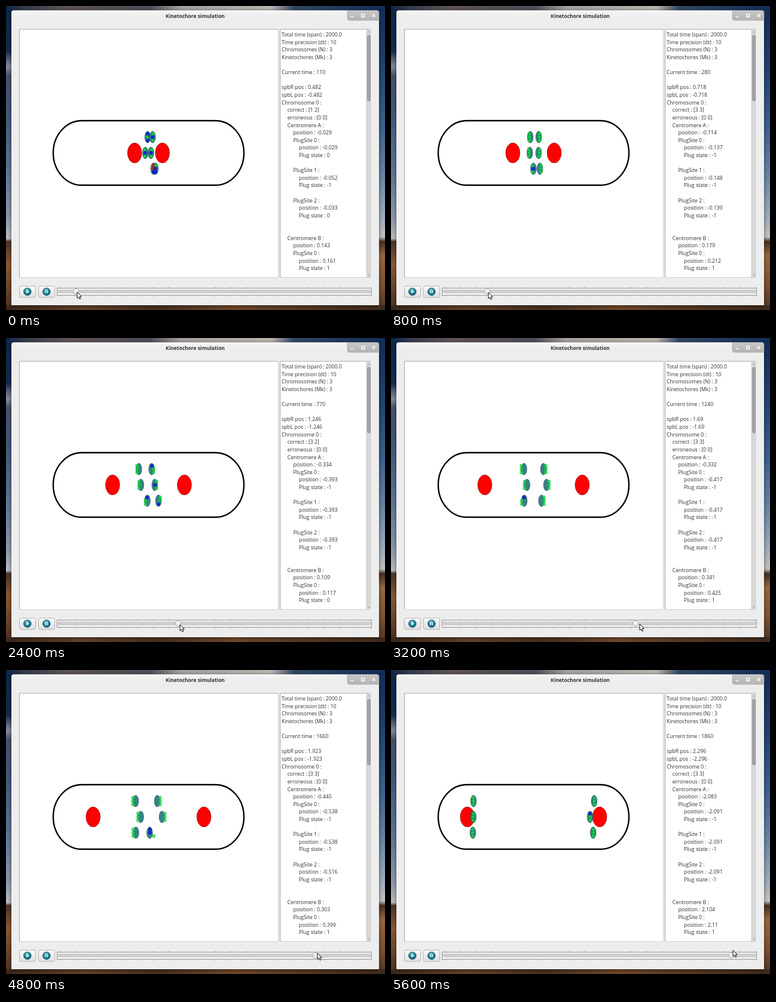
Write an HTML page with a canvas that moves like this. It is 634 by 509 pixels and loops after 6.4 s.

```html
<!DOCTYPE html>
<html lang="en">
<head>
<meta charset="utf-8">
<title>Kinetochore simulation</title>
<style>
  html, body { margin: 0; width: 100%; height: 100%; overflow: hidden; background: #0c2a52; }
  canvas { display: block; }
</style>
</head>
<body>
<canvas id="stage" width="634" height="509"></canvas>
<script>
const W = 634, H = 509, STEP = 800;
const ctx = document.getElementById('stage').getContext('2d');
const CENTER = 238.4, UNIT = 48.2;
const ROWS = [219.5, 246, 272.5];

// pairs: centromere positions and plug states, top row first.
// States: g correct, G correct and stretched, b unplugged, r erroneous.
const keys = [
  { at: 0, time: 110, spb: .482, cursor: [119, 479], reach: .018, plugs: [-.029, -.052, -.033, .161],
    pairs: [[-.029, .143, 'bgb', 'gbg'], [-.112, .085, 'gbg', 'gbg'], [.175, .24, 'rrb', 'gbb']] },
  { at: 2, time: 440, spb: .953, cursor: [207, 480], reach: .047, plugs: [-.245, -.245, -.245, .262],
    pairs: [[-.198, .215, 'ggg', 'ggg'], [-.143, .263, 'ggg', 'ggg'], [-.18, .2, 'gbg', 'ggg']] },
  { at: 3, time: 770, spb: 1.246, cursor: [291, 480], reach: .059, plugs: [-.393, -.393, -.393, .117],
    pairs: [[-.334, .109, 'ggg', 'bgg'], [-.262, .215, 'ggg', 'gbg'], [-.04, .345, 'bgg', 'ggb']] },
  { at: 4, time: 1240, spb: 1.69, cursor: [416, 479], reach: .085, plugs: [-.417, -.417, -.417, .425],
    pairs: [[-.332, .341, 'ggg', 'ggg'], [-.225, .448, 'ggg', 'ggg'], [-.32, .275, 'bgg', 'ggg']] },
  { at: 6, time: 1660, spb: 1.923, cursor: [521, 474], reach: .094, plugs: [-.538, -.538, -.516, .399],
    pairs: [[-.445, .303, 'ggg', 'ggg'], [-.268, .468, 'ggg', 'ggg'], [-.435, .04, 'ggg', 'bbG']] },
  { at: 7, time: 1860, spb: 2.296, cursor: [572, 469], reach: .008, plugs: [-2.091, -2.091, -2.091, 2.11],
    pairs: [[-2.083, 2.104, 'ggg', 'ggg'], [-2.09, 1.962, 'ggg', 'bgg'], [-2.105, 2.07, 'ggg', 'ggg']] }
];

function blend(a, b, k) {
  if (typeof a === 'number') return a + (b - a) * k;
  if (typeof a === 'string') return b;
  if (Array.isArray(a)) return a.map((v, i) => blend(v, b[i], k));
  return Object.fromEntries(Object.keys(a).map(n => [n, blend(a[n], b[n], k)]));
}

function stateAt(step) {
  const i = keys.findIndex(k => k.at >= step);
  if (keys[i].at === step) return keys[i];
  const a = keys[i - 1], b = keys[i];
  const s = blend(a, b, (step - a.at) / (b.at - a.at));
  s.time = Math.round(s.time / 10) * 10;
  return s;
}

function gradient(x0, y0, x1, y1, stops) {
  const g = ctx.createLinearGradient(x0, y0, x1, y1);
  stops.forEach(([p, c]) => g.addColorStop(p, c));
  return g;
}

function rect(x, y, w, h, fill) {
  ctx.fillStyle = fill;
  ctx.fillRect(x, y, w, h);
}

function line(color, width, ...points) {
  ctx.beginPath();
  points.forEach(p => ctx.lineTo(p[0], p[1]));
  ctx.strokeStyle = color;
  ctx.lineWidth = width;
  ctx.stroke();
}

function paint(fill, stroke, width = 1) {
  if (fill) { ctx.fillStyle = fill; ctx.fill(); }
  if (stroke) { ctx.strokeStyle = stroke; ctx.lineWidth = width; ctx.stroke(); }
}

function ellipse(x, y, rx, ry, fill, stroke, width) {
  ctx.beginPath();
  ctx.ellipse(x, y, rx, ry, 0, 0, Math.PI * 2);
  paint(fill, stroke, width);
}

function box(x, y, w, h, r, fill, stroke, width) {
  ctx.beginPath();
  ctx.roundRect(x, y, w, h, r);
  paint(fill, stroke, width);
}

function drawDesktop() {
  rect(0, 0, 317, H, gradient(0, 0, 0, H, [
    [0, '#0b2549'], [.15, '#142b50'], [.175, '#59617a'], [.2, '#868b9a'], [.23, '#47516d'],
    [.35, '#42587c'], [.55, '#617797'], [.7, '#8d9aac'], [.765, '#b9bdc2'],
    [.775, '#4a3324'], [.85, '#8a5a34'], [.93, '#6d4428'], [1, '#4a2e1d']]));
  rect(317, 0, 317, H, gradient(0, 0, 0, H, [
    [0, '#102e58'], [.2, '#1f4371'], [.4, '#3c6290'], [.55, '#6683a6'], [.7, '#a1aebc'],
    [.76, '#c1c2c0'], [.775, '#443022'], [.82, '#97683d'], [.92, '#7d5030'], [1, '#513420']]));
  rect(0, 0, W, 8, gradient(0, 0, W, 0, [
    [0, '#0b2549'], [.05, '#383b4d'], [.15, '#5e5358'], [.38, '#514c58'], [.46, '#a6a09e'],
    [.7, '#bbb5af'], [.76, '#334865'], [1, '#102e58']]));
  rect(0, 501, W, 8, gradient(0, 0, W, 0, [
    [0, '#3b281b'], [.2, '#644127'], [.4, '#473020'], [.6, '#70482a'], [.8, '#553821'], [1, '#3e2a1c']]));
}

function drawWindow() {
  ctx.save();
  ctx.shadowColor = 'rgba(0,0,0,.55)';
  ctx.shadowBlur = 6;
  ctx.shadowOffsetY = 1;
  box(9, 7.5, 615, 493.5, [4, 4, 1, 1], '#ededed');
  ctx.restore();
  box(9, 7.5, 615, 18, [4, 4, 0, 0],
    gradient(0, 8, 0, 26, [[0, '#fafafa'], [.2, '#f1f1f1'], [1, '#ebebeb']]));
  ctx.fillStyle = '#303030';
  ctx.font = 'bold 8.45px "Open Sans", "Noto Sans", sans-serif';
  ctx.textAlign = 'center';
  ctx.fillText('Kinetochore simulation', 316.5, 20);
  ctx.textAlign = 'left';

  box(571, 8, 53, 16, [0, 3, 0, 4],
    gradient(0, 8, 0, 24, [[0, '#c9c9c9'], [1, '#b3b3b3']]), '#a6a6a6', .7);
  line('#fff', 1.5, [576.5, 18], [581.5, 18]);
  ctx.strokeStyle = '#fff';
  ctx.strokeRect(595, 13.8, 4.6, 4.6);
  line('#fff', 1.4, [612.8, 13.7], [617.4, 18.3]);
  line('#fff', 1.4, [617.4, 13.7], [612.8, 18.3]);

  rect(22, 38.5, 434, 416, '#fff');
  line('#a2a2a2', 1, [22.5, 454], [22.5, 39], [456, 39]);
  line('#d2d2d2', 1, [455.5, 39], [455.5, 454.5], [22, 454.5]);
  rect(458, 38.5, 153.5, 416, '#fff');
  line('#a2a2a2', 1, [458.5, 454], [458.5, 39], [611, 39]);
  line('#cfcfcf', 1, [458, 454.5], [611, 454.5]);

  rect(603, 39.5, 8, 414.5, '#d8d8d8');
  line('#bdbdbd', .7, [603, 39], [603, 454]);
  box(604.5, 49, 5, 110, 2, '#a3a3a3', '#8c8c8c', .7);
  line('#777', .8, [605.5, 44.5], [607, 42.7], [608.5, 44.5]);
  line('#777', .8, [605.5, 449.5], [607, 451.3], [608.5, 449.5]);
}

function drawButton(x, paused) {
  box(x + .5, 469, 27, 19, 2.5,
    gradient(0, 469, 0, 488, [[0, '#fbfbfb'], [1, '#dedede']]), '#acacac', .9);
  const cx = x + 13.8, cy = 478.3;
  const ball = ctx.createRadialGradient(cx - 1, cy - 3, 1, cx, cy, 7);
  ball.addColorStop(0, '#6fc0cc');
  ball.addColorStop(.55, '#23879a');
  ball.addColorStop(1, '#0b5366');
  ellipse(cx, cy, 6.4, 6.4, ball, '#174e5c', .6);
  if (paused) {
    rect(cx - 2.3, cy - 2.7, 1.5, 5.4, '#d9f0f2');
    rect(cx + .8, cy - 2.7, 1.5, 5.4, '#d9f0f2');
  } else {
    ctx.beginPath();
    ctx.moveTo(cx - 1.7, cy - 3);
    ctx.lineTo(cx + 3, cy);
    ctx.lineTo(cx - 1.7, cy + 3);
    paint('#d9f0f2');
  }
}

function drawSlider(time) {
  for (let i = 0; i <= 20; i++) {
    const x = 90 + i * 26;
    line('#a0a0a0', .8, [x, 470.3], [x, 472.5]);
    line('#a0a0a0', .8, [x, 484.5], [x, 486.7]);
  }
  ctx.strokeStyle = '#8f8f8f';
  ctx.lineWidth = .9;
  ctx.strokeRect(85.5, 472.3, 526, 12.2);
  box(87, 476.2, 523, 3.6, 1.5, '#d5d5d5', '#a5a5a5', .8);
  const x = 88.7 + time * .2584;
  ellipse(x, 478, 4.6, 4.6,
    gradient(0, 473, 0, 483, [[0, '#fff'], [1, '#dedede']]), '#9a9a9a', .8);
}

function drawCursor([x, y]) {
  ctx.save();
  ctx.translate(x, y);
  ctx.beginPath();
  [[0, 0], [0, 10.3], [2.4, 8.2], [4.1, 12], [5.9, 11.2], [4.2, 7.5], [7.3, 7.3]]
    .forEach(p => ctx.lineTo(...p));
  ctx.closePath();
  paint('#fff', '#111', 1);
  ctx.restore();
}

const colors = { g: 'rgba(5,230,50,.72)', b: 'rgba(0,15,240,.75)', r: 'rgba(240,10,10,.75)' };

function drawPlugs(x, y, states, stretch) {
  [...states].forEach((s, i) => {
    const kind = s.toLowerCase();
    const shift = kind === 'g' ? stretch * (s === 'G' ? 1.5 : 1) : stretch * .1;
    ellipse(x + shift, y + (i - 1) * 5.6, 2.9, 2.9, colors[kind], 'rgba(0,60,30,.4)', .5);
  });
}

function drawCell(s) {
  const l = 79, r = 398, t = 192, b = 300, rx = 48, ry = 54;
  ctx.beginPath();
  ctx.moveTo(l + rx, t);
  ctx.lineTo(r - rx, t);
  ctx.ellipse(r - rx, t + ry, rx, ry, 0, -Math.PI / 2, Math.PI / 2);
  ctx.lineTo(l + rx, b);
  ctx.ellipse(l + rx, t + ry, rx, ry, 0, Math.PI / 2, Math.PI * 1.5);
  ctx.closePath();
  paint('#fff', '#000', 2.4);

  for (const side of [-1, 1])
    ellipse(CENTER + side * s.spb * UNIT, 246, 11.9, 16.8, '#f00', '#7a0000', .6);

  s.pairs.forEach(([a, b, left, right], i) => {
    const xa = CENTER + a * UNIT, xb = CENTER + b * UNIT, y = ROWS[i];
    for (const x of [xa, xb])
      ellipse(x, y, 4.8, 9.7, 'rgba(40,112,128,.9)', '#23505c', .7);
    drawPlugs(xa, y, left, -s.reach * UNIT);
    drawPlugs(xb, y, right, s.reach * UNIT);
  });
}

function drawReport(s) {
  const num = v => String(+v.toFixed(3));
  const [posA, posB, left, right] = s.pairs[0];
  const count = (states, kind) => [...states].filter(c => c === kind).length;
  const plugState = (c, side) => c === 'b' ? 0 : c === 'g' ? side : -side;
  const site = (n, pos, state) =>
    [[2, `PlugSite ${n} :`], [3, `position : ${num(pos)}`], [3, `Plug state : ${state}`], [0, '']];
  const lines = [
    [0, 'Total time (span) : 2000.0'], [0, 'Time precision (dt) : 10'],
    [0, 'Chromosomes (N) : 3'], [0, 'Kinetochores (Mk) : 3'], [0, ''],
    [0, `Current time : ${s.time}`], [0, ''],
    [0, `spbR pos : ${num(s.spb)}`], [0, `spbL pos : ${num(-s.spb)}`],
    [0, 'Chromosome 0 :'],
    [1, `correct : [${count(left, 'g')} ${count(right, 'g')}]`],
    [1, `erroneous : [${count(left, 'r')} ${count(right, 'r')}]`],
    [1, 'Centromere A :'], [2, `position : ${num(posA)}`],
    ...[0, 1, 2].flatMap(n => site(n, s.plugs[n], plugState(left[n], -1))),
    [0, ''],
    [1, 'Centromere B :'], [2, `position : ${num(posB)}`],
    ...site(0, s.plugs[3], plugState(right[0], 1))
  ];
  ctx.fillStyle = '#303030';
  ctx.font = '8.7px "Open Sans", "Noto Sans", sans-serif';
  lines.forEach(([indent, text], i) => ctx.fillText(text, 461 + indent * 9.7, 51.2 + i * 12.61));
}

function draw(step) {
  const s = stateAt(step);
  drawDesktop();
  drawWindow();
  drawCell(s);
  drawReport(s);
  drawButton(22, false);
  drawButton(54, true);
  drawSlider(s.time);
  drawCursor(s.cursor);
}

const start = performance.now();
let shown = -1;
function tick() {
  const step = Math.floor((performance.now() - start) / STEP) % 8;
  if (step !== shown) draw(shown = step);
  requestAnimationFrame(tick);
}
tick();
</script>
</body>
</html>
```
